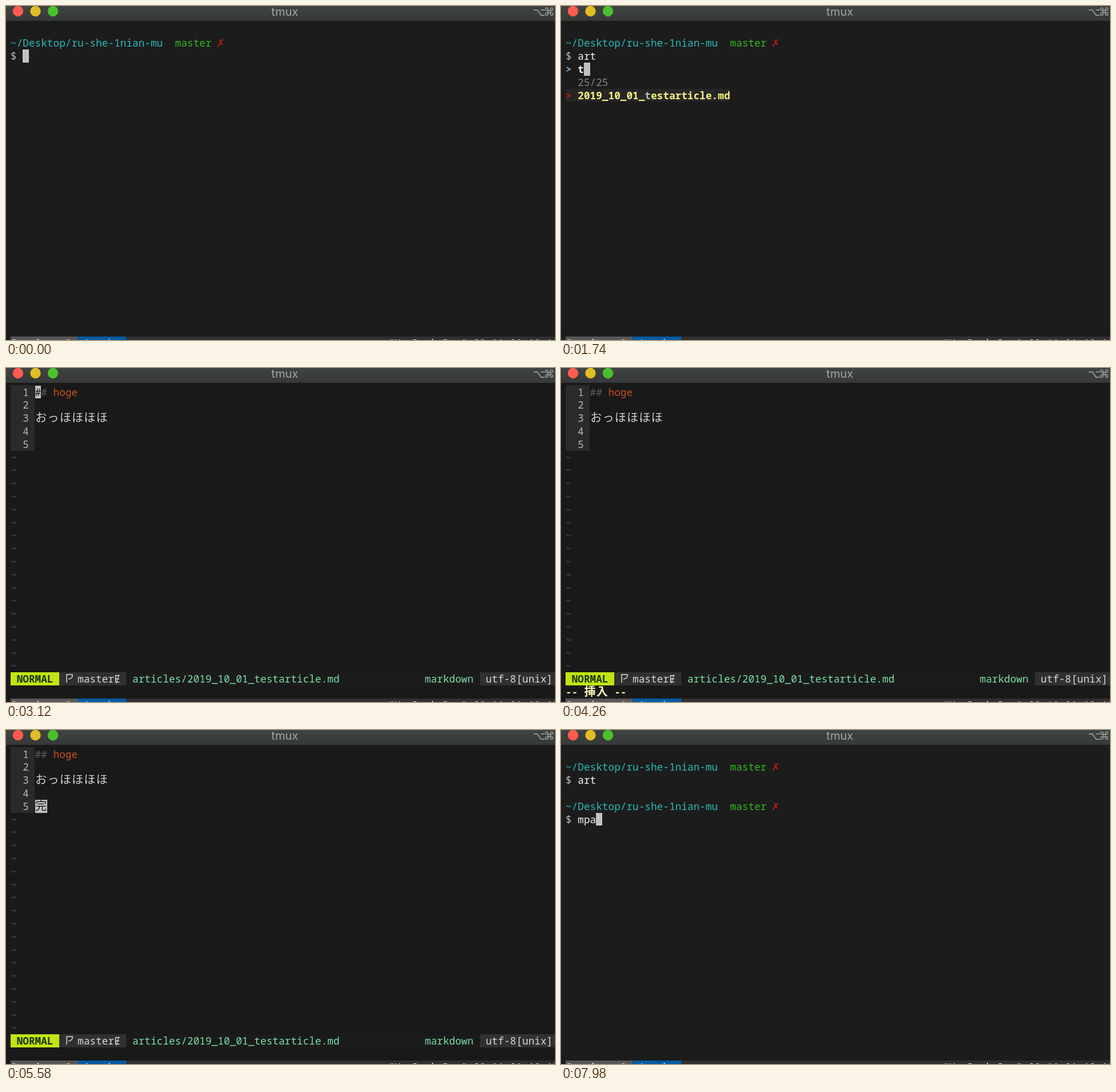
An HTML page with a canvas that plays this animation: 959 by 584 pixels, repeating every 8 s.

```html
<!DOCTYPE html>
<html lang="en">
<head>
<meta charset="utf-8">
<title>Terminal</title>
<style>
html, body { margin: 0; width: 100%; height: 100%; overflow: hidden; background: #1c1c1c; }
canvas { display: block; }
</style>
</head>
<body>
<canvas id="stage" width="959" height="584"></canvas>
<script>
const ctx = document.getElementById('stage').getContext('2d');
const W = 959, H = 584, LOOP = 8000;
const CELL = 10.64, LINE = 22.8, LEFT = 8, TOP = 30.5;
const MONO = '"Noto Sans Mono", "DejaVu Sans Mono", monospace';
const WIDE = '"Noto Sans CJK JP", "Noto Sans CJK", sans-serif';
const GREY = '#c2c2c2', WHITE = '#f2f2f2';

const colX = c => LEFT + c * CELL;
const rowY = r => TOP + r * LINE;
const isWide = ch => ch >= '\u3000';

function rect(x, y, w, h, color) {
  ctx.fillStyle = color;
  ctx.fillRect(x, y, w, h);
}

function cells(col, row, count, color) {
  const x = Math.round(colX(col)), y = Math.round(rowY(row));
  rect(x, y, Math.round(colX(col + count)) - x, Math.round(rowY(row + 1)) - y, color);
}

// Writes on the character grid and returns the column after the text.
function put(col, row, text, color, bold) {
  ctx.fillStyle = color;
  ctx.textAlign = 'center';
  const weight = bold ? 'bold ' : '';
  for (const ch of text) {
    const span = isWide(ch) ? 2 : 1;
    ctx.font = weight + (span === 2 ? '20px ' + WIDE : '17.7px ' + MONO);
    ctx.fillText(ch, colX(col + span / 2), rowY(row) + 18);
    col += span;
  }
  return col;
}

function cursor(col, row) {
  cells(col, row, 1, GREY);
}

// Number of keys pressed so far, given their press times.
const pressed = (t, times) => times.filter(at => t >= at).length;

function titleBar() {
  const fade = ctx.createLinearGradient(0, 0, 0, 26);
  fade.addColorStop(0, '#3f4341');
  fade.addColorStop(1, '#363938');
  rect(0, 0, W, 26, fade);
  ['#ff5b50', '#e0be25', '#4ac12c'].forEach((color, i) => {
    ctx.fillStyle = color;
    ctx.beginPath();
    ctx.arc(21 + i * 30.5, 9, 9.2, 0, Math.PI * 2);
    ctx.fill();
  });
  ctx.fillStyle = '#a4a6a5';
  ctx.textAlign = 'center';
  ctx.font = '20px Inter, "Liberation Sans", sans-serif';
  ctx.fillText('tmux', 487, 17);
  ctx.font = '19px "DejaVu Sans", sans-serif';
  ctx.fillText('⌥', 931.5, 17);
  ctx.fillText('⌘', 949, 17);
}

function sessionBar() {
  rect(LEFT, 578, W - LEFT, 6, '#303030');
  rect(LEFT, 578, 117, 6, '#585858');
  rect(125, 578, 85, 6, '#075aa5');
  put(0, 24, 'Session: 0', WHITE);
  put(12, 24, '1 zsh', WHITE);
  put(62, 24, '"Un-Desk-Dev" 20:11 01-10-19', WHITE);
}

function prompt(row, typed) {
  put(0, row, '~/Desktop/ru-she-1nian-mu', '#2bb9b9');
  put(27, row, 'master', '#31b71e');
  ctx.font = '18px "DejaVu Sans", sans-serif';
  ctx.fillStyle = '#b51c12';
  ctx.fillText('✗', colX(34.5), rowY(row) + 18);
  put(0, row + 1, '$', '#b8b8b8');
  return put(2, row + 1, typed, WHITE);
}

function finder(t) {
  const query = 'test'.slice(0, pressed(t, [1680, 1800, 1920, 1980]));
  put(0, 3, '>', '#87afaf', true);
  cursor(put(2, 3, query, WHITE, true), 3);
  put(2, 4, query.length > 1 ? '1/25' : '25/25', '#858585');
  cells(0, 5, 27, '#262626');
  put(0, 5, '>', '#b81d12', true);
  let col = put(2, 5, '2019_10_01_', '#f3f582', true);
  col = put(col, 5, query, '#bcbcb0', true);
  put(col, 5, 'testarticle.md'.slice(query.length), '#f3f582', true);
}

function shell(t) {
  if (t < 6000) {
    const typed = 'art'.slice(0, pressed(t, [720, 840, 1020]));
    const col = prompt(1, typed);
    if (t < 1320) cursor(col, 2);
    else if (t >= 1440 && t < 2580) finder(t);
    else cursor(0, 3);
    return;
  }
  prompt(1, 'art');
  if (t < 6840) cursor(0, 3);
  else cursor(prompt(4, 'mpa'.slice(0, pressed(t, [7680, 7800, 7920]))), 5);
}

function branchMark(x, y, color) {
  ctx.strokeStyle = color;
  ctx.lineWidth = 1.5;
  ctx.beginPath();
  ctx.moveTo(x + 2, y + 18);
  ctx.lineTo(x + 2, y + 4);
  ctx.lineTo(x + 12, y + 4);
  ctx.quadraticCurveTo(x + 13, y + 11, x + 5, y + 12);
  ctx.stroke();
}

function modeLine(insert) {
  const look = insert
    ? { mode: '#20c1ea', ink: '#003c63', side: '#075fe0', mid: '#000b5e', text: '#f0f0f0', file: '#e4e8f4' }
    : { mode: '#c2e414', ink: '#183510', side: '#303030', mid: '#1b1b1b', text: '#d8d8d8', file: '#7bdfa7' };
  rect(LEFT, 532, W - LEFT, 23, look.mid);
  rect(LEFT, 532, 85, 23, look.mode);
  rect(93, 532, 117, 23, look.side);
  rect(828, 532, W - 828, 23, look.side);
  put(1, 22, insert ? 'INSERT' : 'NORMAL', look.ink, true);
  branchMark(104, 532, look.text);
  put(11, 22, 'masterɆ', look.text);
  put(20, 22, 'articles/2019_10_01_testarticle.md', look.file);
  put(68, 22, 'markdown', look.file);
  put(78, 22, 'utf-8[unix]', look.text);
}

function editor(t) {
  rect(0, 26, W, 552, '#191919');
  rect(LEFT, 30, 42, 115, '#2a2a2a');
  for (let r = 0; r < 5; r++) put(2, r, String(r + 1), '#b7b7ae');
  for (let r = 5; r < 22; r++) put(0, r, '~', '#505050');
  put(4, 0, '##', '#5c5c5c');
  put(7, 0, 'hoge', '#c5501c');
  put(4, 2, 'おっほほほほ', '#d4d4d4');

  const insert = t >= 4320 && t < 5400;
  modeLine(insert);
  if (t >= 4260 && t < 5400) put(0, 23, '-- 挿入 --', '#f7f2b5', true);

  const command = ':wq'.slice(0, pressed(t, [5640, 5760, 5880]));
  if (command) {
    cursor(put(0, 23, command, '#d4d4d4'), 23);
    return;
  }
  if (t < 4260) {
    const row = pressed(t, [3540, 3660, 3780, 3900]);
    cursor(4, row);
    if (row === 0) put(4, 0, '#', '#191919');
    if (row === 2) {
      cells(4, 2, 2, GREY);
      put(4, 2, 'お', '#191919');
    }
  } else if (t >= 4320 && t < 4500) {
    cursor(4, 4);
  } else if (t >= 4500) {
    const word = t < 4620 ? 'か' : t < 4740 ? 'かん' : '完';
    if (t >= 5400) cells(4, 4, 2, GREY);
    const end = put(4, 4, word, t < 5400 ? '#ffffff' : '#191919');
    if (t < 5160) {
      rect(colX(4), 143, colX(end) - colX(4), 1.3, '#ffffff');
      rect(50, 122, 3, 22, '#c8f01e');
    } else if (t < 5400) {
      cursor(end, 4);
    }
  }
}

function draw(t) {
  ctx.textBaseline = 'alphabetic';
  rect(0, 0, W, H, '#1c1c1c');
  if (t >= 2760 && t < 6000) editor(t);
  else shell(t);
  titleBar();
  sessionBar();
}

const start = performance.now();
function tick() {
  draw((performance.now() - start) % LOOP);
  requestAnimationFrame(tick);
}
tick();
</script>
</body>
</html>
```
